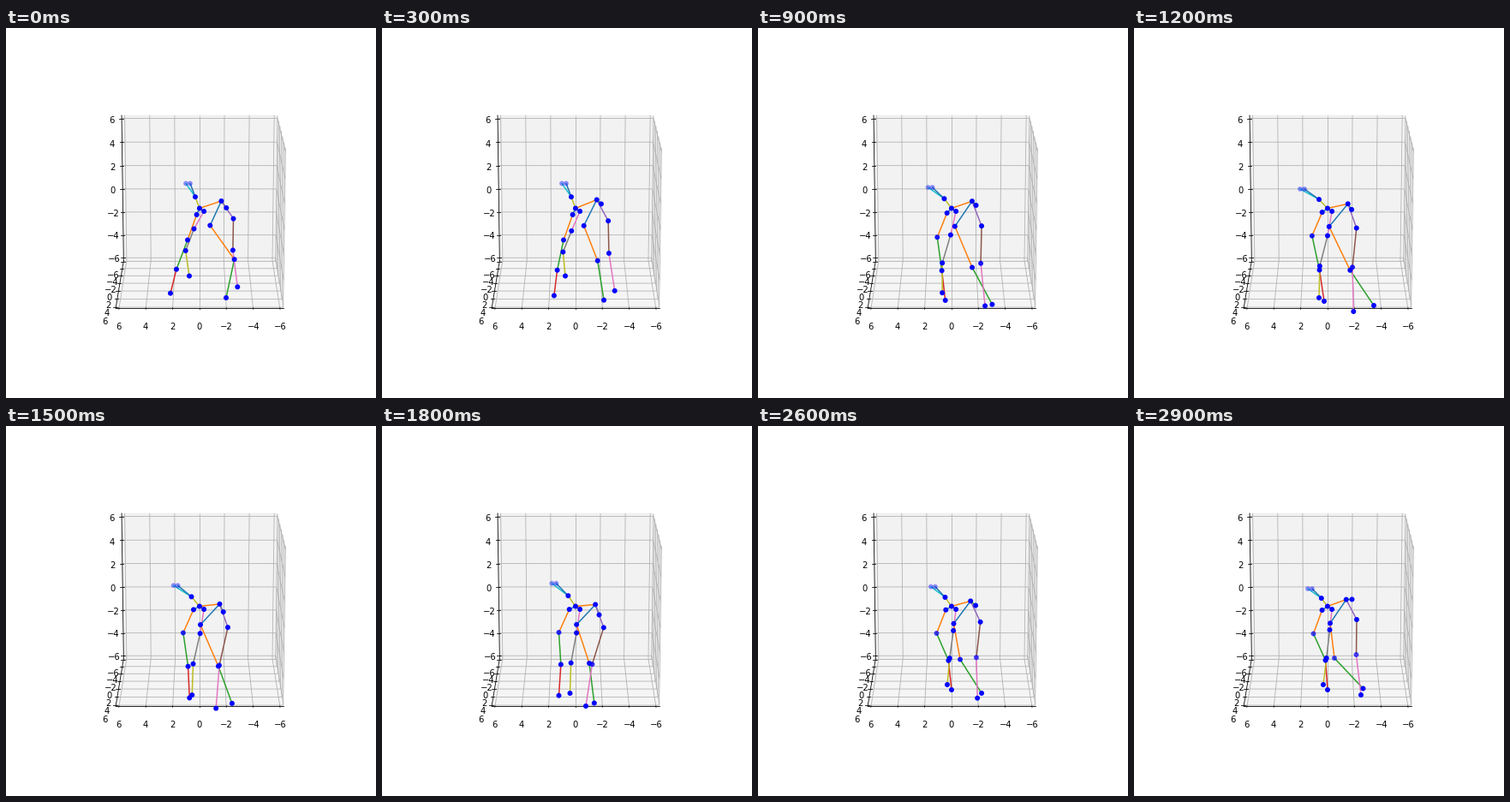
These frames come from a looping animation (432 px wide and 432 px high, 3 s). A matplotlib script:

```python
import numpy as np
import matplotlib.pyplot as plt
from matplotlib.animation import FuncAnimation

SIZE = 432
FRAMES, INTERVAL = 30, 100
LAST = (FRAMES - 1) * INTERVAL
EDGE = 6.25                      # the box reaches a little past the +-6 ticks
TICKS = range(-6, 7, 2)
ELEV = np.radians(15)

# Plot area inside the figure, and the view window it shows.
WIDTH, HEIGHT = SIZE * 0.775, SIZE * 0.755
SCALE = np.array([WIDTH, HEIGHT]) / 0.185
CENTER = np.array([0, SIZE]) + [1, -1] * (SIZE * 0.125 + 0.095 * SCALE)
LABEL_GAP = 11.5 * 48 / (WIDTH + HEIGHT)

fig = plt.figure(figsize=(SIZE / 72, SIZE / 72), dpi=72, facecolor="white")
ax = fig.add_axes([0, 0, 1, 1])
ax.set_xlim(0, SIZE)
ax.set_ylim(SIZE, 0)
ax.axis("off")


# ---- the box, seen in perspective from the +y side ----

def project(x, y, z):
    x, y, z = x / 12, y / 12, z / 12
    c, s = np.cos(ELEV), np.sin(ELEV)
    depth = 10 - y * c - z * s
    return CENTER - SCALE * [x, z * c - y * s] / depth


def polyline(points, color, order, cap="projecting"):
    xs, ys = zip(*(project(*p) for p in points))
    ax.plot(xs, ys, color=color, lw=0.8, zorder=order, solid_capstyle=cap)


def swap(point, axis, value):
    point = list(point)
    point[axis] = value
    return point


def draw_pane(axis, shade):
    """The far side of the box that is square to the axis."""
    a, b = (axis + 1) % 3, (axis + 2) % 3
    far = [-EDGE] * 3
    corners = [far, swap(far, a, EDGE), swap(swap(far, a, EDGE), b, EDGE),
               swap(far, b, EDGE)]
    ax.add_patch(plt.Polygon([project(*p) for p in corners], color=str(shade),
                             alpha=0.5, lw=1, zorder=0))


def draw_axis(axis, edge, tick_axis):
    """Grid, spine, ticks and labels; edge is a corner on the spine."""
    for t in TICKS:
        base = swap([-EDGE] * 3, axis, t)
        polyline([swap(base, (axis + 1) % 3, EDGE), base,
                  swap(base, (axis + 2) % 3, EDGE)], "#b0b0b0", 1, "butt")
    polyline([swap(edge, axis, -EDGE), swap(edge, axis, EDGE)], "black", 1.1)
    for t in TICKS:
        at = swap(edge, axis, t)
        polyline([swap(at, tick_axis, EDGE - 0.1), swap(at, tick_axis, EDGE + 0.2)],
                 "black", 1.2)
        away = [v if i == axis else v + np.sign(v) * LABEL_GAP
                for i, v in enumerate(at)]
        ax.text(*project(*away), str(t).replace("-", "\u2212"), fontsize=10,
                family="DejaVu Sans", ha="center", va="top", zorder=1.3)


for side, shade in enumerate([0.95, 0.90, 0.925]):
    draw_pane(side, shade)
draw_axis(0, (EDGE, EDGE, -EDGE), 1)
draw_axis(1, (EDGE, EDGE, -EDGE), 0)
draw_axis(2, (EDGE, -EDGE, EDGE), 0)


# ---- the walking skeleton ----

def follow(t, *keys):
    """Point at time t on a smooth path through (time, x, y), no overshoot."""
    keys = np.array(keys, float)
    times, p = keys[:, 0], keys[:, 1:]
    t = np.clip(t, times[0], times[-1])
    h = np.diff(times)
    d = np.diff(p, axis=0) / h[:, None]
    slope = np.zeros_like(p)
    slope[0], slope[-1] = d[0], d[-1]
    a, b = d[:-1], d[1:]
    total = np.where(a * b > 0, a + b, 1)
    slope[1:-1] = np.where(a * b > 0, 2 * a * b / total, 0)
    k = min(np.searchsorted(times, t, side="right") - 1, len(h) - 1)
    u = (t - times[k]) / h[k]
    return (p[k] + (p[k + 1] - p[k]) * u * u * (3 - 2 * u)
            + h[k] * u * (1 - u) * (slope[k] * (1 - u) - slope[k + 1] * u))


def between(a, b, mix, bend):
    """Joint part way from a to b, pushed aside by bend."""
    return a + (b - a) * mix + bend


def pose_at(t):
    u = t / LAST
    root = CENTER
    ear = follow(t, (500, 210, 181.5), (1200, 194, 188), (1900, 199, 183.5),
                 (2900, 203, 190))
    hip = follow(t, (0, 251.4, 202), (500, 250.4, 200), (1700, 249.3, 208.5),
                 (2900, 247.8, 202.6))

    elbow_l = follow(t, (300, 212, 247.5), (1800, 206.5, 241), (2900, 209.5, 242.5))
    paw_l = follow(t, (0, 192, 309.7), (1200, 222, 319), (1800, 206.5, 314.7),
                   (2600, 226, 308))
    elbow_r = follow(t, (0, 219.5, 234.5), (1200, 226, 242.5), (2900, 228.5, 238))
    paw_r = follow(t, (400, 214, 289.5), (1200, 216, 315), (1800, 219.5, 312),
                   (2100, 235.5, 306.6), (2600, 221, 302))

    knee_l = follow(t, (0, 238.3, 230.5), (1500, 227, 232), (2900, 229, 230.3))
    ankle_l = follow(t, (0, 266.6, 270.2), (500, 246.6, 273), (1200, 252.3, 282.8),
                     (1800, 242, 277), (2900, 234, 271))
    foot_l = follow(t, (0, 257, 315), (500, 261, 319.4), (1200, 280, 324),
                    (1800, 247.8, 323.5), (2900, 267.5, 306.5))
    knee_r = follow(t, (0, 265.5, 222.6), (1700, 258.8, 235.5), (2900, 260, 226))
    foot_r = follow(t, (0, 270.3, 302.3), (500, 272.2, 310.4), (1200, 256.3, 331),
                    (1800, 238, 327), (2900, 265, 314))
    tail = follow(t, (0, 257.3, 210), (500, 255.3, 203.8), (1950, 253.5, 221),
                  (2900, 254.5, 202.4))

    lift = 247.5 - elbow_l[1]
    return {
        "root": root, "hip": hip, "tail": tail,
        "ear_l": ear, "ear_r": ear + [5, 0],
        "neck": root + (ear - root) * [0.31, 0.46],
        "shoulder_l": np.array([222.6, 218]) - 0.6 * lift,
        "elbow_l": elbow_l, "paw_l": paw_l,
        "wrist_l": between(elbow_l, paw_l, 0.55, [7 * u - 2, -5 * u]),
        "shoulder_r": root + [5.2, 3.5],
        "elbow_r": elbow_r, "paw_r": paw_r,
        "wrist_r": between(elbow_r, paw_r, 0.5, [7 * u - 7, 3 * u - 2]),
        "knee_l": knee_l, "ankle_l": ankle_l, "foot_l": foot_l,
        "knee_r": knee_r, "foot_r": foot_r,
        "ankle_r": between(knee_r, foot_r, 0.5, [-3, -3]),
    }


# Far joints are paler; some drift away, sooner or later by the given power.
pale = {"ear_l": 0.3, "ear_r": 0.3}
fading = {"elbow_l": 1, "ankle_r": 1, "ankle_l": 8}


def opacity(name, t):
    if name in fading:
        return 0.95 - 0.35 * (t / LAST) ** fading[name]
    return pale.get(name, 0.96)


bones = [
    ("root", "shoulder_l", 0), ("shoulder_l", "elbow_l", 1),
    ("elbow_l", "wrist_l", 2), ("wrist_l", "paw_l", 3),
    ("root", "shoulder_r", 5), ("shoulder_r", "elbow_r", 6),
    ("elbow_r", "wrist_r", 7), ("wrist_r", "paw_r", 8),
    ("root", "neck", 8), ("neck", "ear_l", 9), ("neck", "ear_r", 0),
    ("root", "hip", 1), ("hip", "tail", 2),
    ("hip", "knee_l", 0), ("knee_l", "ankle_l", 1), ("ankle_l", "foot_l", 2),
    ("hip", "knee_r", 4), ("knee_r", "ankle_r", 5), ("ankle_r", "foot_r", 6),
]

names = list(pose_at(0))
lines = [ax.plot([], [], color=f"C{c}", lw=1.5, zorder=2)[0] for _, _, c in bones]
dots = ax.scatter(np.zeros(len(names)), np.zeros(len(names)), s=20,
                  linewidths=1.5, zorder=3)


def update(frame):
    t = frame * INTERVAL
    pose = pose_at(t)
    for line, (a, b, _) in zip(lines, bones):
        line.set_data(*zip(pose[a], pose[b]))
    colors = [(0, 0, 1, opacity(n, t)) for n in names]
    dots.set_offsets([pose[n] for n in names])
    dots.set_facecolor(colors)
    dots.set_edgecolor(colors)
    return [*lines, dots]


anim = FuncAnimation(fig, update, frames=FRAMES, interval=INTERVAL,
                     repeat=True, repeat_delay=0)
plt.show()
```
